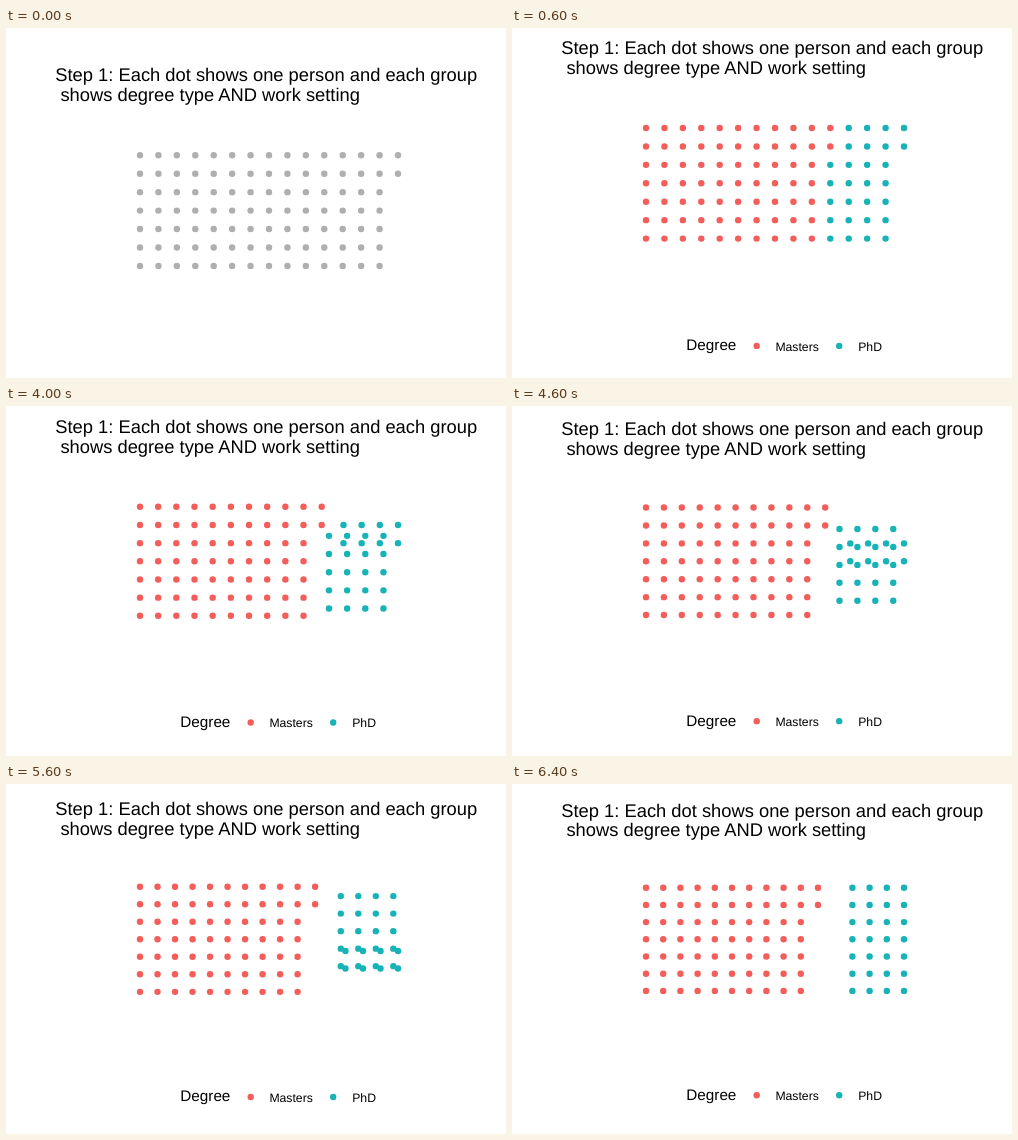
Animation, 500 px wide and 350 px high, one loop 8000 ms. Source, as an HTML page:

```html
<!DOCTYPE html>
<html lang="en">
<head>
<meta charset="utf-8">
<title>Degree groups</title>
<style>
  html, body { margin: 0; width: 100%; height: 100%; overflow: hidden; background: #fff; }
  svg { display: block; width: 500px; height: 350px; }
  text { font-family: "Liberation Sans", Arial, Helvetica, sans-serif; text-rendering: geometricPrecision; fill: #000; }
  .title { font-size: 18.33px; }
  .head { font-size: 15.28px; }
  .label { font-size: 12.22px; }
</style>
</head>
<body>
<svg id="stage" viewBox="0 0 500 350">
  <rect id="back" width="500" height="350"/>
  <text class="title" id="line1" x="49.3">Step 1: Each dot shows one person and each group</text>
  <text class="title" id="line2" x="54.4">shows degree type AND work setting</text>
  <g id="dots"></g>
  <g id="legend">
    <text class="head" id="head" x="174.3">Degree</text>
    <circle class="m" cx="244.7" r="3.2"/>
    <text class="label" x="263.4">Masters</text>
    <circle class="p" cx="327.2" r="3.2"/>
    <text class="label" x="346.2">PhD</text>
  </g>
</svg>
<script>
const LOOP = 8000, STEP = 100, SPLIT = 3500, STEPS = 30;
const LEFT = 134, WIDTH = 258, MID = 155.3;
const PLAIN = { back: '#fff', m: '#afafaf', p: '#afafaf' };
const FLASH = { back: '#747474', m: '#111', p: '#202020' };
const COLOR = { back: '#fff', m: '#f35e5a', p: '#17b3b7' };

const $ = id => document.getElementById(id);
const set = (el, attrs) => { for (const k in attrs) el.setAttribute(k, attrs[k]); };
const legend = $('legend');
const keys = legend.querySelectorAll('circle');
const labels = legend.querySelectorAll('.label');

// Each dot has a start cell and a shift, in grid units.
const dots = [];
function addDot(kind, col, row, dc = 0, dr = 0) {
  const el = document.createElementNS('http://www.w3.org/2000/svg', 'circle');
  set(el, { r: 3.2 });
  $('dots').append(el);
  dots.push({ el, kind, col, row, dc, dr });
}
for (let row = 0; row < 7; row++) {
  const top = row < 2, masters = top ? 11 : 10;
  for (let col = 0; col < masters + 4; col++) {
    if (col < masters) addDot('m', col, row);
    else if (top) addDot('p', col, row, 1, 5);
    else addDot('p', col, row, 2, -2);
  }
}

function draw(t) {
  const look = t < 500 ? PLAIN : t < 600 ? FLASH : COLOR;
  const n = t < SPLIT ? 0 : Math.min(STEPS, Math.floor((t - SPLIT) / STEP) + 1);
  const p = n / STEPS;
  const gap = WIDTH / (14 + p);
  const inset = 5.4 * (WIDTH / 14 - gap);
  const drop = t < 500 ? 27.3 : 0;

  set($('back'), { fill: look.back });
  set($('line1'), { y: Math.round(26 + inset + drop) });
  set($('line2'), { y: Math.round(45.8 + inset + drop) });
  for (const d of dots) {
    set(d.el, {
      cx: LEFT + (d.col + d.dc * p) * gap,
      cy: MID + drop + (d.row + d.dr * p - 3) * gap,
      fill: look[d.kind]
    });
  }

  set(legend, { visibility: t < 500 ? 'hidden' : 'visible' });
  set($('head'), { y: Math.round(322.3 - inset) });
  labels.forEach(el => set(el, { y: Math.round(322.6 - inset) }));
  keys.forEach(el => set(el, { cy: 317.9 - inset, fill: look[el.getAttribute('class')] }));
}

const start = performance.now();
function tick() {
  draw((performance.now() - start) % LOOP);
  requestAnimationFrame(tick);
}
tick();
</script>
</body>
</html>
```
